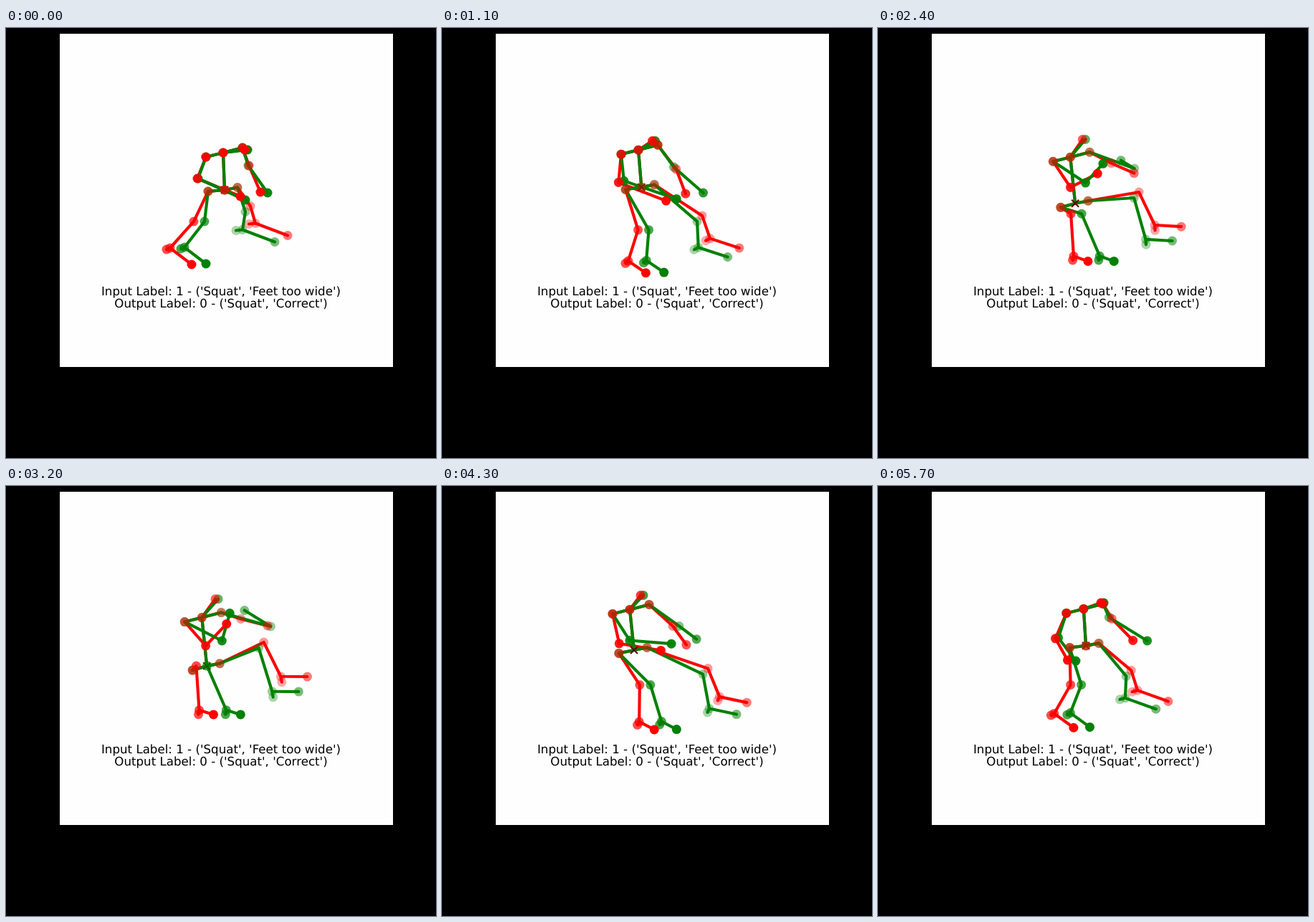
An HTML page that plays this animation: 600x600 px, repeating every 5.8 s.

```html
<!DOCTYPE html>
<html lang="en">
<head>
<meta charset="utf-8">
<title>Squat comparison</title>
<style>
  html, body { margin: 0; width: 100%; height: 100%; overflow: hidden; background: #000; }
  svg { display: block; width: 600px; height: 600px; }
  polyline { fill: none; stroke-width: 4.17; stroke-linecap: round; stroke-linejoin: round; }
  text {
    font: 16.67px "DejaVu Sans", sans-serif; text-anchor: middle; fill: #000;
    text-rendering: geometricPrecision;
  }
</style>
</head>
<body>
<svg viewBox="0 0 600 600">
  <rect width="600" height="600" fill="#000"/>
  <rect x="75" y="8" width="465" height="465" fill="#fefefe"/>
  <g id="bones"></g>
  <path id="root" d="M-5-5L5 5M-5 5L5-5" fill="none" stroke="#600000" stroke-width="2"/>
  <g id="joints"></g>
  <text x="300" y="373">Input Label: 1 - ('Squat', 'Feet too wide')</text>
  <text x="300" y="390">Output Label: 0 - ('Squat', 'Correct')</text>
</svg>
<script>
const LOOP = 5800, STEP = 100, BOTTOM = 3000, RISE = 2800, OPEN_AT = 4300;
const HALF = .62; // depth of the middle key

// Each joint hangs from its parent; path holds the offset when standing, halfway and deep.
// wide: extra offset for the wide stance, open: extra offset as the arms open on the way up,
// fade: opacity lost at full depth.
const joints = {};
function joint(name, parent, alpha, path, extra = {}) {
  joints[name] = { parent, alpha, path, wide: [[0, 0]], open: [0, 0], fade: 0, ...extra };
}

joint('pelvis', null, .75, [[305, 226], [268, 229], [281, 252]], { fade: 1.2 });
joint('hipL', 'pelvis', .6, [[-23, 2], [-20, 6]]);
joint('hipR', 'pelvis', .45, [[18, -3.5]]);
joint('neck', 'pelvis', .95, [[-2, -52], [-6, -56.5], [-7, -68]], { fade: .4 });
joint('head', 'neck', 1, [[34, -4], [19, -20], [23, -26]], { wide: [[-4, 0]], fade: .4 });
joint('shoulderL', 'neck', .95, [[-24, 6]], { fade: .4 });
joint('shoulderR', 'neck', .8, [[27, -7]], { fade: .4 });

joint('elbowL', 'shoulderL', .9, [[-11, 30], [24, 37], [53, 26]],
  { wide: [[-1, 0], [-23, 7]], open: [-7, 0] });
joint('wristL', 'elbowL', .95, [[66, 30], [58, 4.5], [9, -40]],
  { wide: [[-6, -5], [0, 5], [19, 8]], open: [-48, 3] });
joint('elbowR', 'shoulderR', .6, [[8, 25], [42, 30], [70, 19]],
  { wide: [[1, 0], [-9, 0], [-43, -11]], open: [-6, -10], fade: .2 });
joint('wristR', 'elbowR', .95, [[27, 38], [24, 18], [-39, -24]],
  { wide: [[-11, -1], [-5, 8], [77, 33]], open: [16, -6], fade: .45 });

joint('kneeL', 'hipL', .7, [[-5, 42], [44, 44], [19, -8]], { wide: [[-15, 0]] });
joint('ankleL', 'kneeL', .72, [[-28, 36], [15.5, 51], [27, 62]], { wide: [[-5, 1], [-23, 0]] });
joint('heelL', 'ankleL', .7, [[-5, 2], [-1, 6]]);
joint('toeL', 'ankleL', 1, [[30, 23], [21, 11], [20, 6]]);
joint('kneeR', 'hipR', .4, [[11, 34], [78, 37], [53, -24]], { wide: [[7, -8]] });
joint('ankleR', 'kneeR', .38, [[-4, 25], [9, 48], [19, 61]], { wide: [[11, -1], [5, -13]] });
joint('heelR', 'ankleR', .33, [[-9, 1], [1.5, 8]]);
joint('toeR', 'ankleR', .53, [[45, 17], [38, 8], [37, 0]]);

const NAMES = Object.keys(joints);
const CHAINS = [
  'pelvis neck head',
  'wristL elbowL shoulderL neck shoulderR elbowR wristR',
  'toeL ankleL kneeL hipL pelvis hipR kneeR ankleR toeR',
  'ankleL heelL',
  'ankleR heelR'
].map(c => c.split(' '));

// Constant, straight or parabolic path through one, two or three points
function along(path, s) {
  const weights = [
    [1],
    [1 - s, s],
    [(HALF - s) * (1 - s) / HALF, s * (1 - s) / (HALF * (1 - HALF)), s * (s - HALF) / (1 - HALF)]
  ][path.length - 1];
  return [0, 1].map(axis => path.reduce((sum, p, i) => sum + p[axis] * weights[i], 0));
}

// Depth of the squat: a full descent, then a rise that stops a little short of standing
const swing = u => (1 - Math.cos(Math.PI * u)) / 2;
const depthAt = t => t < BOTTOM ? swing(t / BOTTOM) : 1 - .86 * swing((t - BOTTOM) / RISE);
const openAt = t => t < OPEN_AT ? 0 : Math.sin(Math.PI / 2 * (t - OPEN_AT) / (LOOP - OPEN_AT));

function pose(s, open, wide) {
  const at = {};
  for (const name of NAMES) {
    const j = joints[name], base = at[j.parent] || [0, 0];
    const own = along(j.path, s), extra = along(j.wide, s);
    at[name] = base.map((b, i) => b + own[i] + wide * extra[i] + open * j.open[i]);
  }
  return at;
}

const $ = id => document.getElementById(id);
const set = (el, attrs) => { for (const k in attrs) el.setAttribute(k, attrs[k]); };
function add(parent, tag, attrs) {
  const el = document.createElementNS('http://www.w3.org/2000/svg', tag);
  set(el, attrs);
  return parent.appendChild(el);
}

const figures = [['#ff0000', 1], ['#008000', 0]].map(([color, wide]) => ({
  color, wide,
  bones: CHAINS.map(() => add($('bones'), 'polyline', { stroke: color }))
}));
for (const f of [...figures].reverse())
  f.dots = NAMES.map(() => add($('joints'), 'circle', { r: 6.5, fill: f.color }));

function draw(t) {
  const s = depthAt(t), open = openAt(t);
  for (const f of figures) {
    const at = pose(s, open, f.wide);
    CHAINS.forEach((c, i) => set(f.bones[i], { points: c.map(n => at[n]).join(' ') }));
    NAMES.forEach((name, i) => {
      const { alpha, fade } = joints[name], [cx, cy] = at[name];
      set(f.dots[i], { cx, cy, 'fill-opacity': Math.max(0, alpha - fade * s) });
    });
    set($('root'), { transform: `translate(${at.pelvis})` });
  }
}

const start = performance.now();
let shown = -1;
function tick() {
  const t = Math.floor((performance.now() - start) % LOOP / STEP) * STEP;
  if (t !== shown) draw(shown = t);
  requestAnimationFrame(tick);
}
tick();
</script>
</body>
</html>
```
